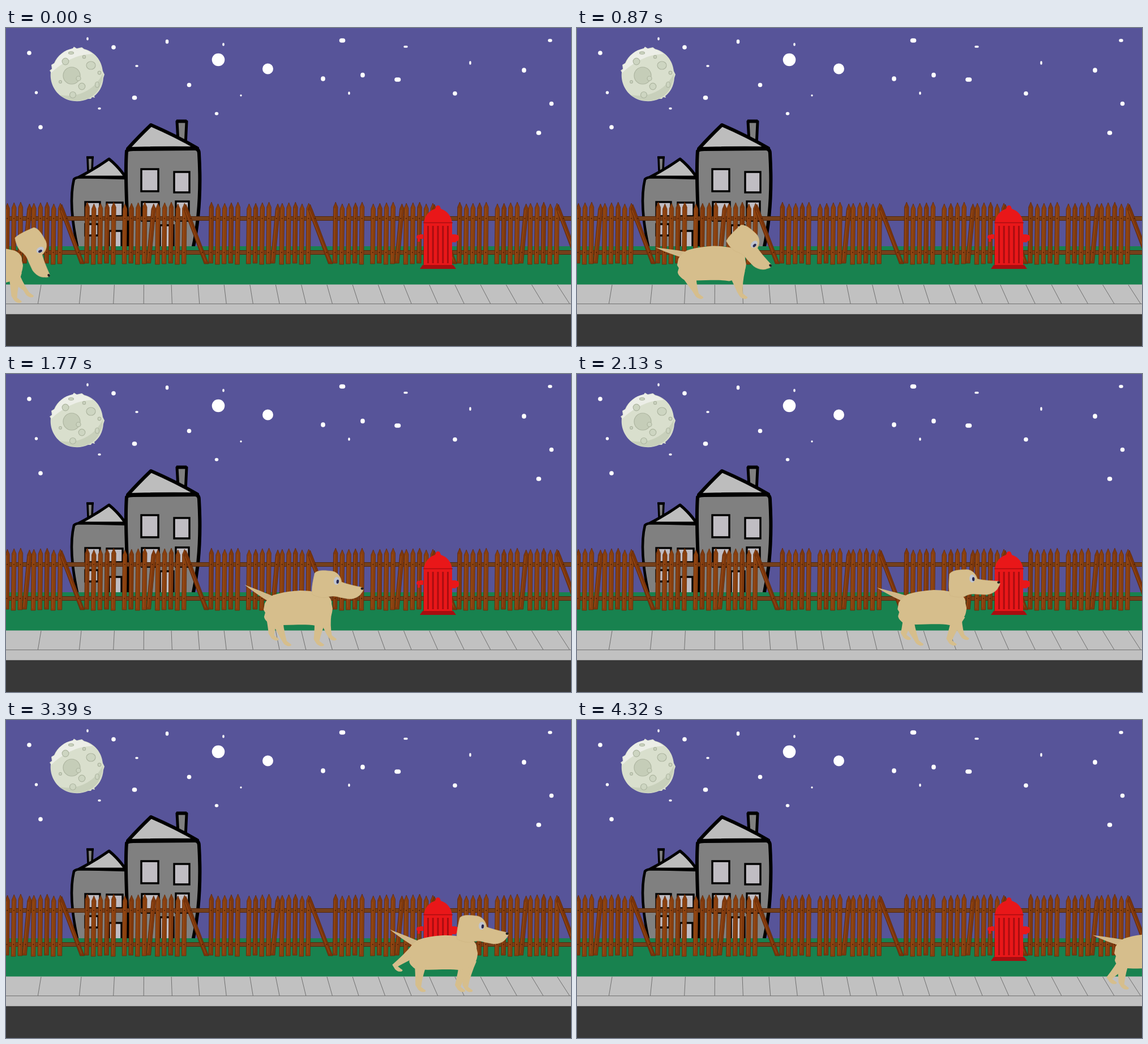
An HTML page for the animation above (4.52 s loop, 998 by 561 pixels).

```html
<!DOCTYPE html>
<html lang="en">
<head>
<meta charset="utf-8">
<title>Night walk</title>
<style>
  html, body { margin: 0; width: 100%; height: 100%; overflow: hidden; background: #575499; }
  svg { display: block; width: 100vw; height: 100vh; }
  .dots { fill: none; stroke: #fff; stroke-linecap: round; }
  .crater { fill: #cdd5c1; stroke: #adb5a0; stroke-width: 1.2; }
  .house { stroke: #000; stroke-width: 6; stroke-linejoin: round; }
  .wall { fill: #808080; }
  .roof { fill: #bdbdbd; }
  .pane { fill: #c0bdc3; stroke: #000; stroke-width: 3.4; }
  .coat { fill: #d6be8c; }
</style>
</head>
<body>
<svg viewBox="0 0 998 561" preserveAspectRatio="none">
  <rect width="998" height="561" fill="#575499"/>

  <!-- stars: small, medium, large, then the two brightest -->
  <path class="dots" stroke-width="3.4" d="M144 18v2M384 28v2M230 67h2M415 119h0M164 142h2M606 114v2M820 60v3M704 33h4"/>
  <path class="dots" stroke-width="5.4" d="M284.500 23v2M53.500 114h0M960 22h2M371.500 151h1"/>
  <path class="dots" stroke-width="7.600" d="M41 44h0M190 34h0M323.500 100.500h0M226.500 123h1M61 175h0M793 115.500h0M963.500 133.500h0M940.500 185h1M690 91h3.500M592.500 22h3M560 89h0v1M630 82.500h0v1M915 74h0v1"/>
  <path class="dots" stroke-width="19" d="M375 56h0M462.500 72h0"/>
  <circle cx="375" cy="56" r="11.300" fill="#fff"/>

  <g transform="translate(-1)">
    <path fill="#d9dfcd" d="M119 36L121 33L126 36L135 34L139 37C158 42 170 57 172 76L175 82L173 88C172 103 165 114 157 120L158 123L153 122L151 125L146 125C134 131 114 131 101 122C86 113 78 95 80 78L78 75L82 72L81 65L86 62C92 48 104 39 119 36Z"/>
    <path fill="#eceee7" d="M81 79L80 75L83 72L82 65L87 62C93 48 105 39 119 36L121 34L126 37L135 35L139 38C145 39 150 43 154 46C130 45 102 59 81 79Z"/>
    <path fill="#c8d0bb" d="M172 80C172 103 160 124 133 128C118 130 104 125 96 118C126 124 157 111 172 80Z"/>
    <g class="crater">
      <circle cx="117" cy="84" r="15" fill="#c5cdb8"/>
      <ellipse cx="151" cy="66" rx="8" ry="7"/>
      <circle cx="106" cy="59" r="5.800"/>
      <circle cx="135" cy="103" r="5.800"/>
      <circle cx="119" cy="118" r="5.500"/>
      <circle cx="129" cy="89" r="4"/>
      <ellipse cx="116" cy="44" rx="4.500" ry="2.200"/>
      <ellipse cx="162" cy="100" rx="3.500" ry="5"/>
      <circle cx="139" cy="51" r="2.600"/>
      <circle cx="166" cy="79" r="2.800"/>
      <circle cx="97" cy="95" r="2.400"/>
    </g>
  </g>

  <g class="house">
    <path class="wall" d="M302 165L319 165L317 207L304 200Z" stroke-width="5"/>
    <path d="M301 164H319" stroke-width="5"/>
    <path class="wall" d="M144 229H153L152 252H145Z" stroke-width="3.6"/>
    <path d="M142 228H155" stroke-width="3.6"/>
    <path class="wall" d="M127 390C117 345 112 300 120 267Q123 263 134 263L213 265V390Z" stroke-width="4.6"/>
    <path class="roof" d="M129 263Q158 248 182 231Q200 246 211 263Z" stroke-width="5"/>
    <path class="wall" d="M215 390C216 330 209 270 213 217Q216 214 225 214L334 213Q341 213 341 222C345 290 340 345 330 390Z"/>
    <path class="roof" d="M215 213Q236 190 256 171Q300 190 338 212Q275 211 215 213Z"/>
  </g>
  <path class="pane" d="M239 249H269V288H239ZM297 254H324V290H297ZM240 307H270V340H240ZM300 306H323V340H300ZM272 348H296V395H272ZM140 307H166V332H140ZM178 308H206V332H178ZM140 346H163V366H140ZM182 358H204V392H182Z"/>

  <rect y="385" width="998" height="68" fill="#18824f"/>
  <g id="fence"></g>

  <rect y="452.5" width="998" height="53" fill="#c1c1c1"/>
  <path id="joints" fill="none" stroke="#666" stroke-width=".9"/>
  <rect y="504.8" width="998" height="57" fill="#383838"/>

  <g fill="#e91719">
    <path d="M737 372H731V377H727V372L725 370V368L727 365H731V364H737ZM788 364H795V365H798L800 368V372L798 376H795V378H788Z"/>
    <path d="M738 420V344C739 331 748 322 758 319C759 315 760 313 763 313S767 315 768 319C778 322 787 331 788 344V420Z"/>
    <path fill="none" stroke="#a90d10" stroke-width="1.6" d="M737 343.5H789"/>
    <path fill="none" stroke="#a90d10" stroke-width="3" d="M745.5 349V415M754.2 349V415M763 349V415M771.8 349V415M780.5 349V415"/>
    <path fill="#a90d10" d="M736 418H790L795 425H731Z"/>
  </g>

  <g id="dog" class="coat">
    <path id="tail" fill="#d0b788" d="M-56 0C-37 -2 -15 -5 4 -6L8 7C-10 6 -30 5 -56 0Z"/>
    <path class="leg"/><path class="leg"/><path class="leg"/><path class="leg"/>
    <path d="M566 404C569 398 574 394 581 389C596 384 612 382 628 381C645 381 660 384 672 387C680 391 685 397 684 404L686 413C685 421 684 426 680 431C673 437 665 441 656 443C638 440 617 442 597 442L577 441C570 437 565 431 565 427L567 420L564 415Z"/>
    <g id="head">
      <path stroke="#cdb481" stroke-width=".6" d="M-41 -10C-36 -17 -22 -17 -10 -17C0 -16 6 -8 8 0C20 3 35 4 45 5C49 7 48 11 45 15C42 22 34 27 24 28L8 27C-2 25 -10 27 -15 30C-24 33 -35 30 -41 28C-44 18 -42 0 -41 -10Z"/>
      <ellipse cx="-1" cy="-1" rx="5" ry="7" fill="#c0c5d2"/>
      <ellipse cx="1" cy="0" rx="2.2" ry="3.6" fill="#29294f"/>
      <ellipse cx="45.5" cy="7" rx="2.6" ry="2.1" fill="#222"/>
    </g>
  </g>
</svg>

<script>
const $ = id => document.getElementById(id);
const { PI, sin, cos, exp, log, min, max, hypot, floor } = Math;
const mix = (a, b, u) => a + (b - a) * u;

// Cosine ease from 0 to 1 between two times
const ease = (t, from, to) => (1 - cos(PI * min(1, max(0, (t - from) / (to - from))))) / 2;

// Paving: gaps narrow to the right while the joints lean over
function paving() {
  let d = 'M0 486.7H998';
  for (let i = 0; i < 20; i++) {
    const x = 62 + 45.2 * i + 53 * (1 - exp(-i / 1.5));
    d += `M${x} 453L${x + (x - 250) * .03} 486.5`;
  }
  return d;
}

// Fence: the same panel repeated, each ending in a fallen board
const rail = y => `<path d="M0 ${y}H998" stroke="#53290f" stroke-width="8"/><path d="M0 ${y}H998" stroke="#75401b" stroke-width="6.2"/>`;

function board(top, bottom, y, end, tone) {
  const w = 3.8;
  const nail = ny => `<circle cx="${mix(top, bottom, (ny - y) / (end - y))}" cy="${ny}" r="1" fill="#3e1c08"/>`;
  return `<path fill="${tone}" stroke="#5f2806" stroke-width=".7" d="M${top} ${y}Q${top + 2} ${y + 5} ${top + w} ${y + 9}L${bottom + w} ${end}H${bottom - w}L${top - w} ${y + 9}Q${top - 2} ${y + 5} ${top} ${y}Z"/>
    <path stroke="#9c4e18" d="M${top - 1.4} ${y + 11}L${bottom - 1.4} ${end - 4}"/>` + nail(336) + nail(396);
}

function fence() {
  let out = rail(336) + rail(396);
  for (let x0 = 143 - 219.3; x0 < 998; x0 += 219.3) {
    for (let i = 0; i < 15; i++) {
      const x = x0 + 11.7 * i + (i < 5 ? 0 : 8);
      const lean = i === 9 ? 4.5 : .6;
      out += board(x + lean, x - lean, 307 + i * 7 % 4, 415 + i * 5 % 3, i % 3 ? '#89400f' : '#7f390d');
    }
    out += board(x0 + 175, x0 + 211, 311, 416, '#7a340a');
  }
  return out;
}

$('joints').setAttribute('d', paving());
$('fence').innerHTML = fence();

// Dog: walks in, brakes at the hydrant, waits, walks off
const FRONT = 686, STOP = 834, SPEED = .309, BRAKE = 2370;

function chest(t) {
  const left = STOP - 30 - SPEED * BRAKE;
  const arrive = t < BRAKE ? 30 + SPEED * t : STOP - left * exp((BRAKE - t) * SPEED / left);
  return arrive + .346 * 50 * log(1 + exp((t - 3635) / 50));
}

function legPath(hx, tx, ty) {
  const hy = min(425, ty - 38), ax = tx - 14, ay = ty - 5;
  const len = hypot(ax - hx, ay - hy);
  const nx = (ay - hy) / len, ny = (hx - ax) / len;
  const kx = (hx + ax) / 2, ky = (hy + ay) / 2;
  return `M${hx - 12 * nx} ${hy - 12 * ny}Q${kx - 7 * nx} ${ky - 7 * ny} ${ax - 4} ${ay - 5}` +
    `L${ax + 1} ${ay + 3}Q${ax + 6} ${ay + 8} ${tx - 2} ${ty + 2}Q${tx + 3} ${ty} ${tx - 3} ${ty - 3}` +
    `L${ax + 6} ${ay - 2}Q${kx + 6 * nx} ${ky + 6 * ny} ${hx + 12 * nx} ${hy + 12 * ny}Z`;
}

const legs = document.querySelectorAll('.leg');

function pose(t) {
  const dx = chest(t) - FRONT;
  const wait = ease(t, 2500, 2850) - ease(t, 3480, 3640);
  const since = t - 870;
  $('dog').setAttribute('transform', `translate(${dx} ${-dx * .009})`);

  const tilt = 65 * (1 - ease(t, 0, 2400)) + 11 * wait, d = tilt / 65;
  $('head').setAttribute('transform',
    `translate(${FRONT + 12 - 34 * d + 52 * d * d} ${361 + 26 * d}) rotate(${tilt - 3.5})`);
  $('tail').setAttribute('transform', `translate(580 397) rotate(${21 - 7 * cos(PI * since / 840)})`);

  // Paired legs swing in opposite phase; one hind leg lifts during the wait
  const swing = mix(sin(PI * since / 360), .6, wait);
  legs.forEach((leg, i) => {
    const side = i % 2 ? -1 : 1, hind = i < 2, s = side * swing;
    let x = (hind ? -76 - .009 * since : 2 - .007 * since) + 11 * s;
    let y = 472 + 7 * wait + (hind ? 5 : -5) * s * (1 - wait);
    if (hind && side < 0) {
      x = mix(x, -133, wait);
      y = mix(y, 443, wait);
    }
    leg.setAttribute('d', legPath(FRONT + (hind ? -103 : -17) + 3 * side, FRONT + x, y));
  });
}

const LOOP = 4520, LAST = 4320, STEP = 30;
const start = performance.now();
function tick() {
  const t = (performance.now() - start) % LOOP;
  pose(min(floor(t / STEP) * STEP, LAST));
  requestAnimationFrame(tick);
}
tick();
</script>
</body>
</html>
```
